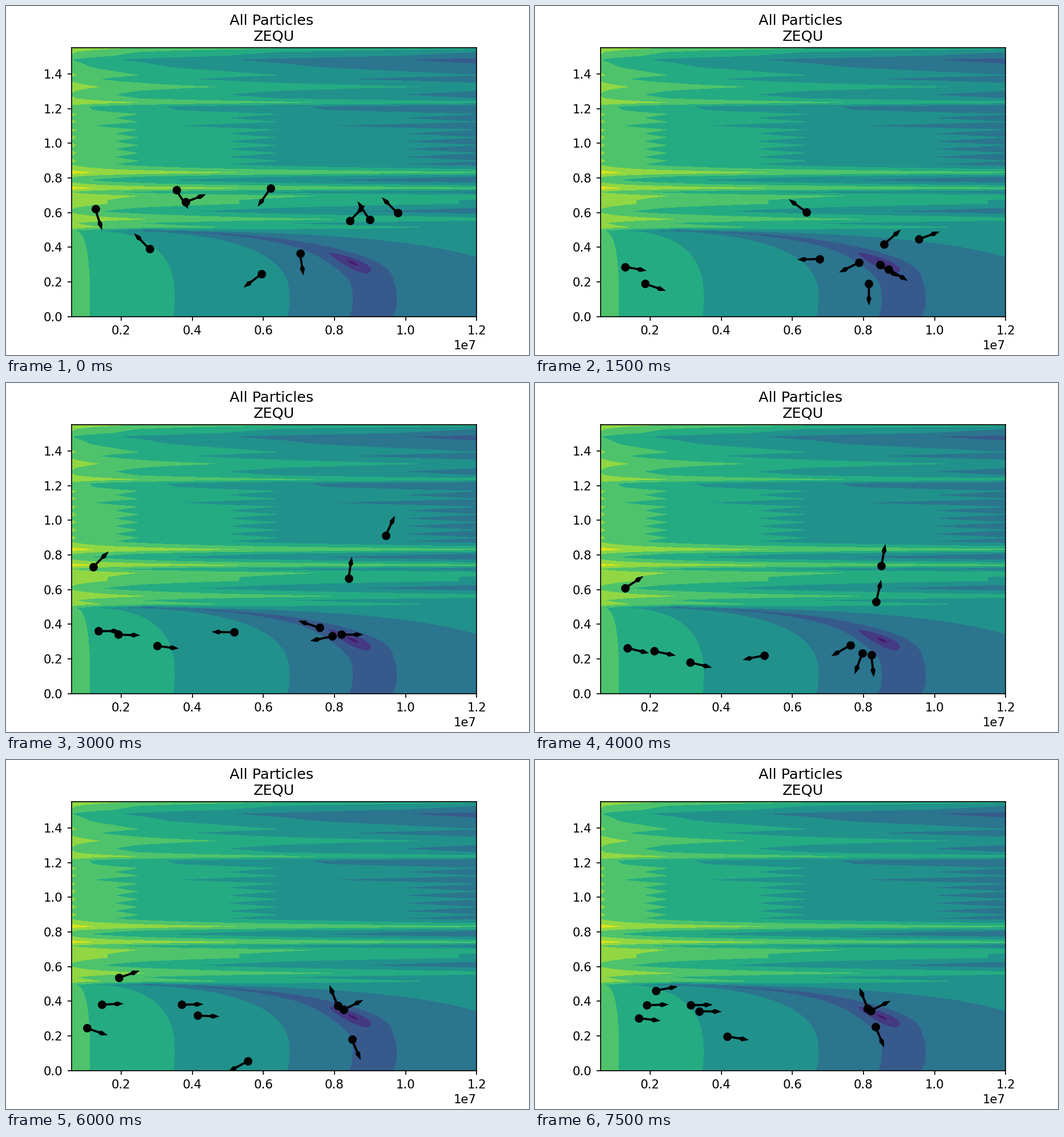
A matplotlib script that plays this animation: 917 px wide and 611 px high, repeating every 8 s.

```python
import numpy as np
import matplotlib.pyplot as plt
from matplotlib.animation import FuncAnimation

W, H = 917, 611
DPI = W / 6
STEPS, STEP_MS = 16, 500
X_MIN, X_MAX, Y_MAX = 0.6e6, 12e6, 1.55
LEFT, RIGHT = 0.125 * W, 0.9 * W
TOP, BOTTOM = 0.12 * H, 0.89 * H
ROWS, SHORE = 70, 47          # sampled rows, row where the smooth basin begins
ARROW, SAG = 39, 35

fig, ax = plt.subplots(figsize=((W + 0.01) / DPI, (H + 0.01) / DPI), dpi=DPI)
ax.set_title("All Particles \nZEQU")


def to_data(x, y):
    """Stage pixels (y down) to axes data."""
    return (X_MIN + (x - LEFT) / (RIGHT - LEFT) * (X_MAX - X_MIN),
            (BOTTOM - y) / (BOTTOM - TOP) * Y_MAX)


def ridges(x):
    """Noisy rows: zigzag heights with a few marked ridges and troughs."""
    rows = np.arange(SHORE)
    height = np.where(rows % 2, 7.15, 6.92)
    marks = {0: 7.9, 3: 6.0, 4: 6.35, 5: 6.55, 8: 6.7, 10: 7.6, 14: 7.95,
             15: 6.5, 16: 6.6, 20: 6.6, 31: 7.6, 32: 8.4, 34: 6.5, 35: 7.4,
             36: 8.4, 37: 6.9, 38: 7.95, 39: 7.7, 40: 7.7, 42: 6.75,
             43: 7.4, 44: 8.0, 46: 7.6}
    height[list(marks)] = list(marks.values())
    far = x - LEFT
    fall = 0.62 * np.log1p(far / 28) + 0.0019 * far
    hold = 1 - 0.2 * np.maximum(height - 6.8, 0)   # high ridges fade slower
    return height[:, None] - hold[:, None] * fall


def basin(x, y):
    """Valley whose distance from the left edge follows a rounded arch."""
    arch = 1 - (np.abs(y - 512) / 119) ** 2.5
    t = (x - LEFT) / (531 * np.cbrt(arch))
    z = np.interp(t, [0, 0.06, 0.34, 0.72, 0.928, 1, 1.075, 1.5, 6],
                  [6.4, 6, 5, 4, 3, 2.55, 3, 4, 5])
    pit = 1.7 * np.exp(-((y - 450) / 18) ** 2)
    return z - pit * np.exp(-((t - 1) / 0.05) ** 2)


def shade(x, y, z):
    colors = plt.get_cmap("viridis")((np.arange(9) + 0.5) / 9)
    ax.contourf(*to_data(x, y), np.clip(z, 0, 8.99),
                levels=np.arange(10), colors=colors)


xs = np.linspace(LEFT, RIGHT, 400)
row_y = np.linspace(TOP, BOTTOM, ROWS)[:SHORE + 1]
low_y = np.linspace(row_y[-1], BOTTOM, 200)
shade(xs, row_y, np.vstack([ridges(xs), basin(xs, row_y[-1])]))
shade(xs, low_y, basin(xs, low_y[:, None]))

# Swarm key poses; x + yj in stage pixels
POSES = {
    0: [156+355j, 251+425j, 298+322j, 314+343j, 463+319j,
        447+469j, 515+433j, 602+376j, 637+374j, 686+362j],
    1: [158+442j, 198+456j, 516+302j, 517+404j, 571+413j,
        611+415j, 626+425j, 614+391j, 674+395j, 659+454j],
    6: [152+322j, 161+434j, 264+460j, 399+436j, 549+428j,
        571+443j, 587+440j, 600+342j, 665+267j, 196+440j],
    12: [197+381j, 167+428j, 335+447j, 423+527j, 581+430j,
         591+437j, 606+489j, 581+430j, 141+469j, 307+428j],
}
FIRST_HEADINGS = [-72, 134, -57, 21, -125, -143, -81, 46, 123, 135]
BEST, REST, SOURCE = 585+440j, 230+430j, 40+435j


def swarm(step):
    """Positions: speed up from pose to pose on a sagging path, then settle."""
    keys = list(POSES)
    begin = max(k for k in keys if k <= step)
    a = np.array(POSES[begin])
    if begin == keys[-1]:
        hub = np.where(a.real > 500, BEST, REST)
        return a + (hub - a) * 0.15 * (step - begin)
    end = min(k for k in keys if k > step)
    t = (step - begin) / (end - begin)
    return a + (np.array(POSES[end]) - a) * t * t + 1j * SAG * np.sin(np.pi * t)


def headings(step, pos):
    """Away from the best point, or away from the left edge near it."""
    if step == 0:
        return np.radians(FIRST_HEADINGS)
    return -np.angle(pos - np.where(pos.real > 345, BEST, SOURCE))


start = swarm(0)
zero = np.zeros(len(start))
arrows = ax.quiver(*to_data(start.real, start.imag), zero, zero,
                   color="black", units="dots", width=3.8,
                   scale_units="dots", scale=1, headwidth=2.3, headlength=3.2,
                   headaxislength=4.5, zorder=3)
dots, = ax.plot([], [], "o", color="black", ms=7, mew=0, zorder=3)
ax.set_xlim(X_MIN, X_MAX)
ax.set_ylim(0, Y_MAX)


def draw(step):
    pos = swarm(step)
    x, y = to_data(pos.real + 0.5, pos.imag + 0.5)
    angle = headings(step, pos)
    arrows.set_offsets(np.column_stack([x, y]))
    arrows.set_UVC(ARROW * np.cos(angle), ARROW * np.sin(angle))
    dots.set_data(x, y)
    return arrows, dots


anim = FuncAnimation(fig, draw, frames=STEPS, interval=STEP_MS,
                     repeat=True, repeat_delay=0)
plt.show()
```
